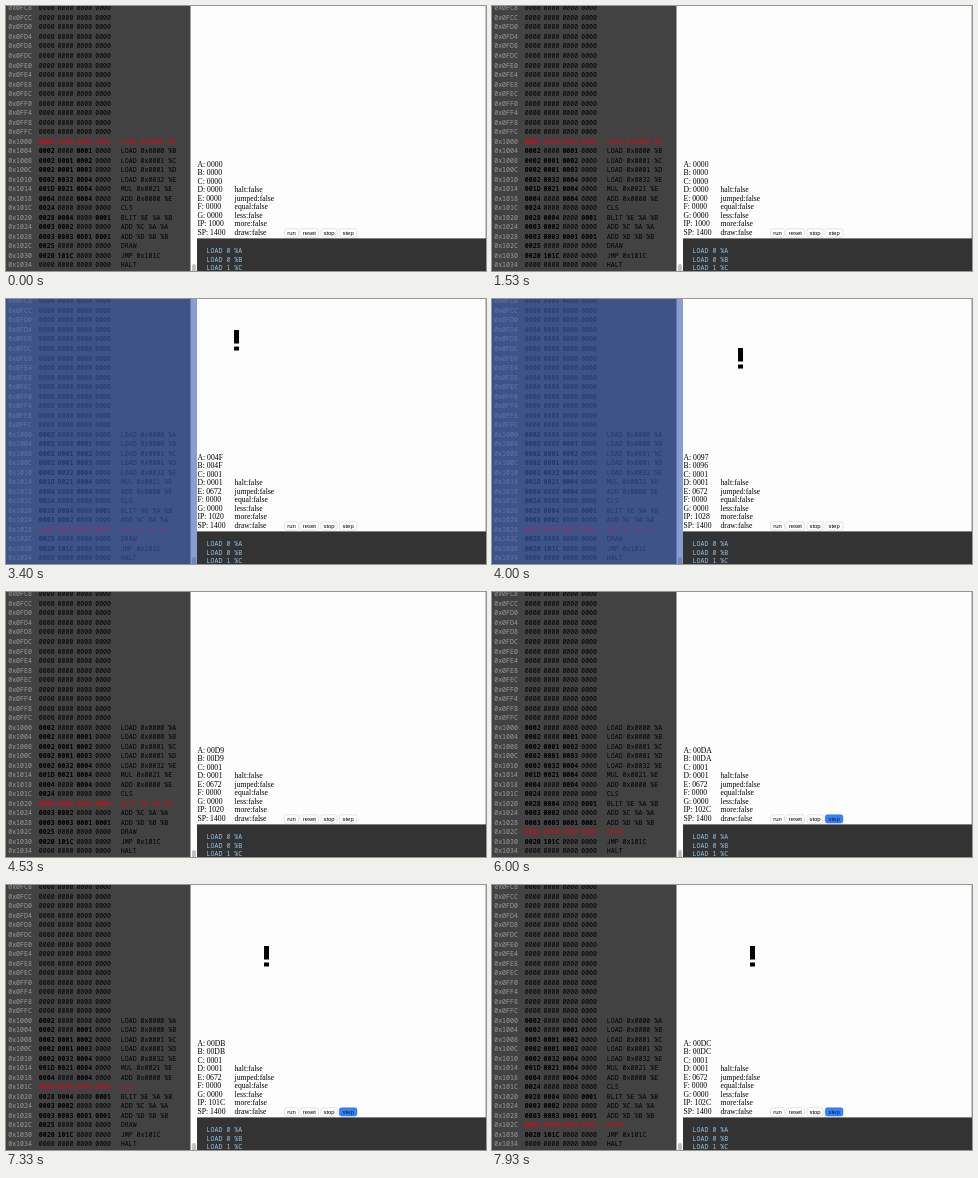
An HTML page with a canvas that plays this animation: 480x265 px, repeating every 8 s.

```html
<!DOCTYPE html>
<html>
<head>
<meta charset="utf-8">
<style>
html, body { margin: 0; width: 100%; height: 100%; overflow: hidden; background: #fff; }
canvas { display: block; width: 480px; height: 265px; }
</style>
</head>
<body>
<canvas id="stage"></canvas>
<script>
const LOOP = 8000, RUN = 2670, SHOWN = 2742, STOP = 4530;
const STEPS = [5465, 5735, 5930, 6070, 6200, 6330, 6450, 6570, 6865, 7065, 7265, 7465, 7735, 7830, 7930];
const CYCLE = [0x1020, 0x1024, 0x1028, 0x102C, 0x1030, 0x101C];
const PROGRAM = [
  '0002 0000 0000 0000|LOAD 0x0000 %A',
  '0002 0000 0001 0000|LOAD 0x0000 %B',
  '0002 0001 0002 0000|LOAD 0x0001 %C',
  '0002 0001 0003 0000|LOAD 0x0001 %D',
  '0002 0032 0004 0000|LOAD 0x0032 %E',
  '001D 0021 0004 0000|MUL 0x0021 %E',
  '0004 0000 0004 0000|ADD 0x0000 %E',
  '0024 0000 0000 0000|CLS',
  '0028 0004 0000 0001|BLIT %E %A %B',
  '0003 0002 0000 0000|ADD %C %A %A',
  '0003 0003 0001 0001|ADD %D %B %B',
  '0025 0000 0000 0000|DRAW',
  '0020 101C 0000 0000|JMP 0x101C',
  '0000 0000 0000 0000|HALT'
];
const MONO = '6.6px "Noto Sans Mono", monospace';
const SERIF = '7.7px "Liberation Serif", serif';
const SANS = '5.9px "Liberation Sans", sans-serif';
const PAPER = '#fdfdfe', RED = '#c80f1b';

const canvas = document.getElementById('stage');
const ratio = window.devicePixelRatio || 1;
canvas.width = 480 * ratio;
canvas.height = 265 * ratio;
const ctx = canvas.getContext('2d');
ctx.scale(ratio, ratio);

const hex = n => n.toString(16).toUpperCase().padStart(4, '0');

function rect(x, y, w, h, color) {
  ctx.fillStyle = color;
  ctx.fillRect(x, y, w, h);
}

function text(str, x, y, font, color, align = 'left') {
  ctx.font = font;
  ctx.fillStyle = color;
  ctx.textAlign = align;
  ctx.fillText(str, x, y);
}

// Machine state at time t: registers, highlighted row, sprite and pressed button.
function stateAt(t) {
  const s = { a: 0, b: 0, one: 0, e: 0, ip: 0x1000, row: 0x1000, mark: null, pressed: '' };
  if (t >= 2600 && t < 2735) s.pressed = 'run';
  if (t >= 4400 && t < 4520) s.pressed = 'stop';
  if (t < RUN) return s;
  s.one = 1;
  s.e = 0x672;
  if (t < STOP) {
    const count = Math.max(0, Math.round((t - SHOWN) * 0.12));
    const midLoop = Math.floor(t / 200) % 2 === 0 && t > 2900;
    s.a = count;
    s.b = midLoop ? count - 1 : count;
    s.ip = midLoop ? 0x1028 : 0x1020;
    s.row = t < 4400 ? 0x1028 : 0x1020;
    const shift = (t - 2800) * 0.03;
    if (t >= SHOWN && t < 4470) s.mark = [210 + shift, 13 + shift];
    return s;
  }
  const done = STEPS.filter(at => at <= t).length;
  s.a = 0xD9 + Math.floor((done + 4) / 6);
  s.b = 0xD9 + Math.floor((done + 3) / 6);
  s.ip = s.row = CYCLE[done % 6];
  if (done >= 4) s.mark = done < 10 ? [256, 59] : [258, 61];
  if (STEPS.some(at => t >= at - 65 && t < at + 75)) s.pressed = 'step';
  return s;
}

function drawMemory(current) {
  rect(0, 0, 184.5, 265, '#434243');
  ctx.fillStyle = '#c1c1c1';
  ctx.beginPath();
  ctx.roundRect(186, 258, 4, 10, 2);
  ctx.fill();
  for (let i = 0; i < 28; i++) {
    const address = 0xFC8 + i * 4, y = 2.5 + i * 9.52;
    const [data, code] = (PROGRAM[i - 14] || '0000 0000 0000 0000|').split('|');
    const color = address === current ? RED : '#000';
    text('0x' + hex(address), 2.2, y, MONO, '#999');
    data.split(' ').forEach((word, k) =>
      text(word, 32.8 + k * 18.8, y, (word === '0000' ? '' : 'bold ') + MONO, color));
    text(code, 114.8, y, MONO, color);
  }
}

function drawRegisters(s) {
  const values = { A: s.a, B: s.b, C: s.one, D: s.one, E: s.e, F: 0, G: 0, IP: s.ip, SP: 0x1400 };
  const flags = ['halt', 'jumped', 'equal', 'less', 'more', 'draw'];
  Object.entries(values).forEach(([name, value], i) => {
    const y = 158.6 + i * 8.5;
    text(name + ': ' + hex(value), 191.5, y, SERIF, '#000');
    if (i > 2) text(flags[i - 3] + ':false', 228.5, y, SERIF, '#000');
  });
}

function drawButton(label, x, w, pressed) {
  ctx.beginPath();
  ctx.roundRect(x, 222.8, w, 8.3, 2);
  ctx.fillStyle = pressed ? '#3483f5' : '#fff';
  ctx.fill();
  ctx.lineWidth = 0.5;
  ctx.strokeStyle = pressed ? '#2468d8' : '#c9c9c9';
  ctx.stroke();
  text(label, x + w / 2, 227.2, SANS, pressed ? '#0a1c40' : '#000', 'center');
}

function draw(t) {
  const s = stateAt(t);
  ctx.textBaseline = 'middle';
  rect(0, 0, 480, 265, PAPER);
  rect(479, 0, 1, 265, '#c8c8c8');
  drawMemory(s.row);
  if (t >= RUN && t < 4400) rect(0, 0, 191, 265, 'rgba(59, 95, 182, 0.6)');
  if (s.mark) {
    const [x, y] = s.mark;
    rect(x, y, 5, 13.5, '#000');
    rect(x, y + 16.5, 5, 4, '#000');
  }
  drawRegisters(s);
  [['run', 278.5, 14], ['reset', 294, 18.5], ['stop', 315, 16], ['step', 333.3, 17.6]]
    .forEach(([label, x, w]) => drawButton(label, x, w, s.pressed === label));
  rect(191, 232.4, 289, 33, '#333');
  ['LOAD 0 %A', 'LOAD 0 %B', 'LOAD 1 %C'].forEach((line, i) =>
    text(line, 200.6, 245.5 + i * 8.4, MONO, '#93bde2'));
}

function tick() {
  draw(performance.now() % LOOP);
  requestAnimationFrame(tick);
}
tick();
</script>
</body>
</html>
```
